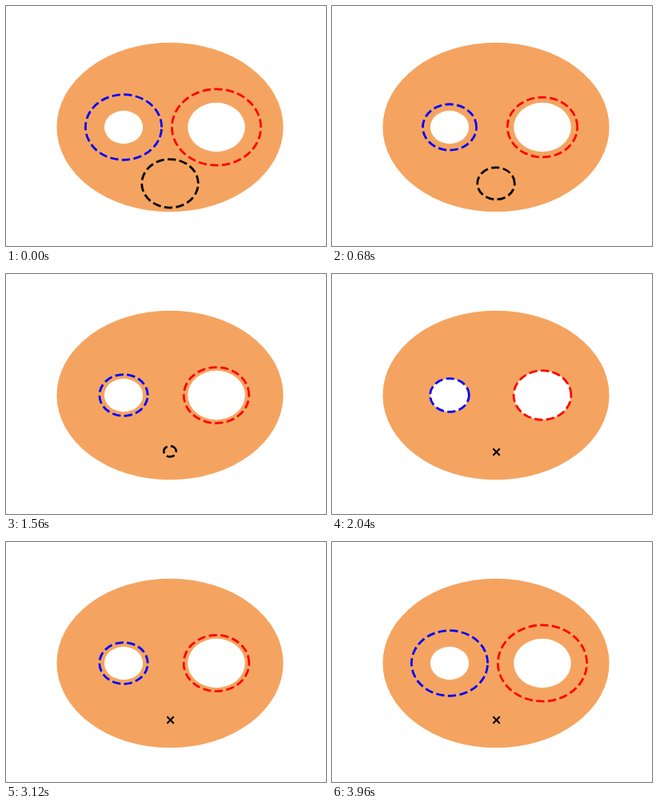
These frames come from a looping animation (400x300 px, 4000 ms). An HTML page with a canvas:

```html
<!DOCTYPE html>
<html lang="en">
<head>
<meta charset="utf-8">
<title>Shrinking loops</title>
<style>
  html, body { margin: 0; width: 100%; height: 100%; overflow: hidden; background: #fff; }
  canvas { display: block; }
</style>
</head>
<body>
<canvas id="stage" width="400" height="300"></canvas>
<script>
const ctx = document.getElementById('stage').getContext('2d');
const STEP_MS = 40, STEPS = 100, CONTRACTED = 50;
const ASPECT = 0.857, MID_Y = 151.5;

const blueLoop = { x: 147, color: '#00f', min: 23.6, max: 47.6, bounce: 30.2 };
const redLoop = { x: 263, color: '#f00', min: 35.3, max: 55.6, bounce: 40.8 };
const point = { x: 205, y: 221.8, radius: 35.3 };

function disc(x, rx, ry, color) {
  ctx.fillStyle = color;
  ctx.beginPath();
  ctx.ellipse(x, MID_Y, rx, ry, 0, 0, 2 * Math.PI);
  ctx.fill();
}

function dashedLoop(x, y, r, color) {
  ctx.strokeStyle = color;
  ctx.lineWidth = 2.78;
  ctx.setLineDash([10.28, 4.44]);
  ctx.beginPath();
  ctx.ellipse(x, y, r, r * ASPECT, 0, 2 * Math.PI, 0, true);
  ctx.stroke();
}

function cross(x, y, half) {
  ctx.strokeStyle = '#000';
  ctx.lineWidth = 2.08;
  ctx.setLineDash([]);
  ctx.beginPath();
  ctx.moveTo(x - half, y - half);
  ctx.lineTo(x + half, y + half);
  ctx.moveTo(x - half, y + half);
  ctx.lineTo(x + half, y - half);
  ctx.stroke();
}

// Shrink onto the hole, bounce off it twice, then grow back.
function loopRadius({ min, max, bounce }, step) {
  const mix = (top, k) => min + (top - min) * k;
  if (step < 30) return mix(max, 1 - step / 29);
  if (step >= 70) return mix(max, (step - 70) / 29);
  const rise = (step % 10) / 9;
  const rising = Math.floor(step / 10) % 2 === 1;
  return mix(bounce, rising ? rise : 1 - rise);
}

function draw(step) {
  ctx.fillStyle = '#fff';
  ctx.fillRect(0, 0, 400, 300);
  disc(205, 141.6, 105.7, '#f4a460');
  disc(blueLoop.x, 24.1, 20.7, '#fff');
  disc(redLoop.x, 35.8, 30.7, '#fff');

  for (const loop of [blueLoop, redLoop]) {
    dashedLoop(loop.x, MID_Y, loopRadius(loop, step), loop.color);
  }
  if (step < CONTRACTED) {
    dashedLoop(point.x, point.y, point.radius * (1 - step / CONTRACTED), '#000');
  } else {
    cross(205.5, 222.5, 4.17);
  }
}

const start = performance.now();
function tick() {
  const elapsed = performance.now() - start;
  draw(Math.floor(elapsed / STEP_MS) % STEPS);
  requestAnimationFrame(tick);
}
tick();
</script>
</body>
</html>
```
